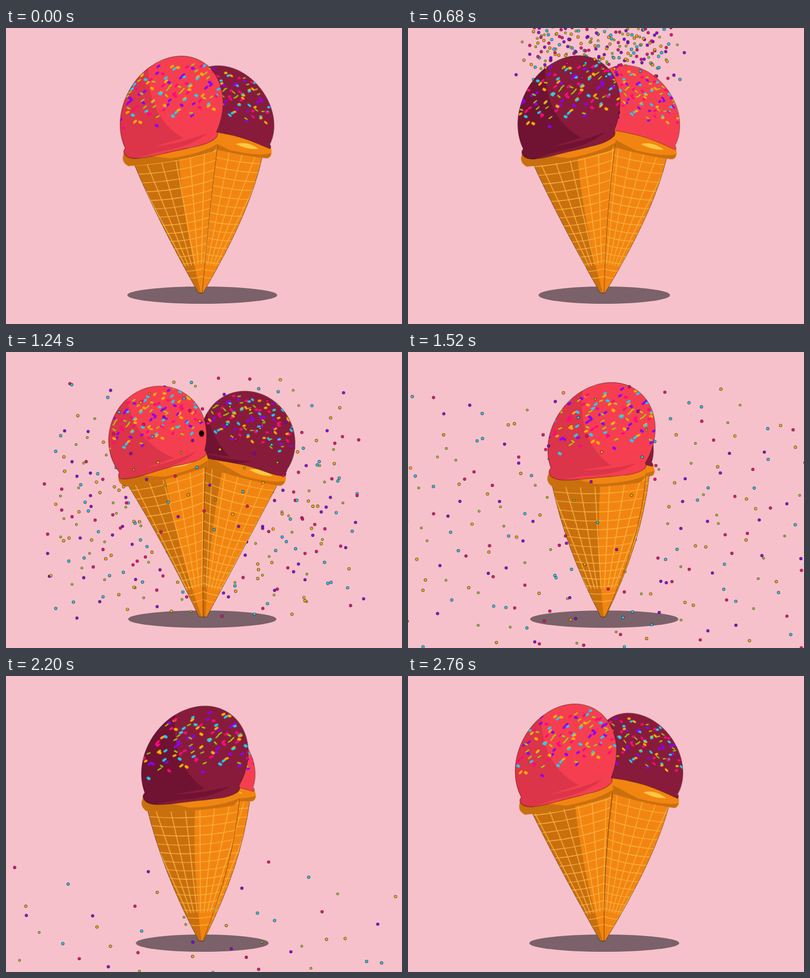
These frames come from a looping animation (800x600 px, 2.8 s). An HTML page without scripts:

```html
<!DOCTYPE html>
<html lang="en">
<head>
<meta charset="utf-8">
<title>Twin cones</title>
<style>
html, body { margin: 0; width: 100%; height: 100%; overflow: hidden; background: #f6c1cb; }
svg { position: absolute; left: 0; top: 0; width: 800px; height: 600px; }
.defs, .floor { z-index: 0; }
.over { z-index: 3; }

/* One turn takes 1400 ms; 0% is the pose nearest the viewer. */
.pink { --main: #f53f50; --shade: #dc3448; --turn: -1255ms; }
.plum { --main: #881b3b; --shade: #701231; --turn: -555ms; }
.pink, .plum { animation: depth 1400ms step-end var(--turn) infinite; }
.head, .axis, .body, .dome, .side, .dusk, .face { animation: head 1400ms linear var(--turn) infinite; }
.axis { animation-name: axis; }
.body { animation-name: body; }
.dome { animation-name: dome; }
.side { animation-name: side; }
.dusk { animation-name: dusk; }
.face { animation-name: face; }
.fan { animation: fan 70ms linear infinite; }
.slide { animation: slide 700ms linear infinite; }
.open { animation: open 1400ms step-end var(--turn) infinite; }
.happy { animation: happy 1400ms step-end var(--turn) infinite; }
.outline { fill: none; stroke: #000; stroke-opacity: .45; }
.shadow { transform-origin: 396.5px 541.5px; animation: shadow 700ms cubic-bezier(.37,0,.63,1) -20ms infinite alternate; }

@keyframes depth { 0% { z-index: 2 } 25% { z-index: 1 } 75%, 100% { z-index: 2 } }
@keyframes head {
  0%, 100% { transform: translate(392px,246px) rotate(-1deg) skewX(-10deg) scale(1.1,1.17) }
  11% { transform: translate(440px,242px) rotate(8deg) skewX(-6deg) scale(1.06,1.12) }
  24% { transform: translate(488px,233px) rotate(15deg) skewX(0deg) scale(1,1) }
  37.5% { transform: translate(463px,229px) rotate(14deg) skewX(14deg) scale(.95,.96) }
  49% { transform: translate(408px,229px) rotate(2deg) skewX(14deg) scale(.95,.94) }
  61% { transform: translate(345px,222px) rotate(-14deg) skewX(0deg) scale(.95,.92) }
  74% { transform: translate(316px,229px) rotate(-14.4deg) skewX(0deg) scale(1,1.02) }
  87.5% { transform: translate(320px,241px) rotate(-11.5deg) skewX(-12deg) scale(1.07,1.15) }
}
@keyframes axis {
  0%, 100% { transform: translate(394px,540px) rotate(0deg) scale(1.15,1) }
  11% { transform: translate(391px,540px) rotate(8.5deg) scale(1.1,1) }
  24% { transform: translate(404px,540px) rotate(15.4deg) scale(1,1.04) }
  37.5% { transform: translate(395px,540px) rotate(13deg) scale(.95,1.03) }
  49% { transform: translate(396px,540px) rotate(2deg) scale(.95,1) }
  61% { transform: translate(391px,540px) rotate(-9deg) scale(.95,1.03) }
  74% { transform: translate(395px,540px) rotate(-14.4deg) scale(1,1.04) }
  87.5% { transform: translate(392px,540px) rotate(-12.5deg) scale(1.1,1.02) }
}
@keyframes body {
  0%, 100% { d: path("M296 260Q320 401 390 537L398 537Q482 380 491 255Z") }
  11% { d: path("M352 240Q347 391 386 537L397 537Q440 381 522 260Z") }
  24% { d: path("M399 222Q398 390 401 537L409 537Q478 398 562 266Z") }
  37.5% { d: path("M393 222Q391 390 391 537L398 537Q500 370 526 262Z") }
  49% { d: path("M325 245Q340 400 391 537L399 537Q470 390 485 250Z") }
  61% { d: path("M284 258Q369 402 386 537L395 537Q395 390 425 215Z") }
  74% { d: path("M243 265Q335 403 391 537L399 537Q398 390 398 222Z") }
  87.5% { d: path("M246 268Q299 380 388 537L396 537Q393 390 414 232Z") }
}
@keyframes dome {
  0%, 11%, 87.5%, 100% { d: path("M-88-2Q-92-7-87-12A98 98 0 1 1 87-14Q91-9 87-4C72 8 40 6 0 8S-78 15-88-2Z") }
  24%, 74% { d: path("M-88 5Q-92-2-87-8A98 98 0 1 1 87-12Q91-8 87-2C66 8 40 2 10 2S-62 10-88 5Z") }
  37.5%, 61% { d: path("M-88-1Q-92-6-87-10A98 98 0 1 1 87-10Q91-6 87-1C62-6 34-13 0-13S-62-12-88-1Z") }
}
@keyframes side {
  0%, 11%, 100% { transform: skewX(-2deg) }
  24% { transform: skewX(6deg) }
  37.5% { transform: skewX(9deg) }
  61%, 87.5% { transform: skewX(-3deg) }
  74% { transform: skewX(0deg) }
}
@keyframes dusk {
  0%, 11%, 74%, 100% { transform: translateX(0) }
  24% { transform: translateX(-45px) }
  37.5% { transform: translateX(-80px) }
  61% { transform: translateX(-15px) }
}
@keyframes face {
  0%, 25% { transform: translate(-140px,-42px) }
  36% { transform: translate(-84px,-44px) }
  39% { transform: translate(-52px,-46px) }
  61% { transform: translate(-8px,-53px) }
  74% { transform: translate(68px,-39px) }
  82% { transform: translate(145px,-39px) }
  82.01%, 100% { transform: translate(-140px,-42px) }
}
@keyframes open { 0% { opacity: 1 } 48% { opacity: 0 } 72%, 100% { opacity: 1 } }
@keyframes happy { 0% { opacity: 0 } 48% { opacity: 1 } 72%, 100% { opacity: 0 } }
@keyframes fan { to { transform: skewX(-5.52deg) } }
@keyframes slide { to { transform: translateX(314px) } }
@keyframes shadow { from { transform: scaleX(1) } to { transform: scaleX(.877) } }

/* Confetti clouds: a unit cloud is moved and stretched, its dots keep their size. */
.cloud { animation: wide 2800ms linear infinite; }
.plume { animation-name: plume; }
.near { animation-name: near; }
.brief { animation-name: brief; }
.dots path { fill: none; stroke-linecap: round; vector-effect: non-scaling-stroke; stroke-width: var(--w, 4.8px); }
.edge { --ink: #2b1822; --w: 6.2px; }
@keyframes wide {
  0%, 20% { transform: translate(390px,-130px) scale(1.6,.8) }
  24.3% { transform: translate(390px,20px) scale(1.75,.95) }
  35.7% { transform: translate(400px,220px) scale(2.4,2) }
  54.3% { transform: translate(400px,335px) scale(4.1,2.7) }
  67.1% { transform: translate(400px,450px) scale(4.3,2.5) }
  78.6% { transform: translate(400px,640px) scale(4.5,2.8) }
  95%, 100% { transform: translate(400px,1050px) scale(4.6,3) }
}
@keyframes plume {
  0%, 20% { transform: translate(390px,-140px) scale(1.3,.8) }
  24.3% { transform: translate(390px,10px) scale(1.4,1) }
  35.7% { transform: translate(395px,315px) scale(1.9,1.25) }
  54.3% { transform: translate(400px,370px) scale(4.2,2.5) }
  67.1% { transform: translate(400px,480px) scale(4.4,2.3) }
  78.6% { transform: translate(400px,740px) scale(4.6,2.6) }
  90%, 100% { transform: translate(400px,1000px) scale(4.6,2.6) }
}
@keyframes near {
  0%, 20% { transform: translate(390px,-120px) scale(1.1,.7) }
  24.3% { transform: translate(390px,25px) scale(1.3,.8) }
  35.7% { transform: translate(395px,125px) scale(1.7,.9) }
  54.3% { transform: translate(400px,310px) scale(4.3,2.5) }
  67.1% { transform: translate(400px,620px) scale(4.5,3) }
  78.6%, 100% { transform: translate(400px,1000px) scale(4.6,3) }
}
@keyframes brief {
  0%, 20% { transform: translate(390px,-130px) scale(1.4,.8) }
  24.3% { transform: translate(390px,25px) scale(1.5,.9) }
  35.7% { transform: translate(400px,190px) scale(1.9,1.4) }
  45% { transform: translate(400px,360px) scale(3.4,2) }
  57%, 100% { transform: translate(400px,900px) scale(5,2) }
}
</style>
</head>
<body>
<svg class="defs" viewBox="0 0 800 600">
  <defs>
    <g id="rim">
      <path fill="#f28511" d="M-88-8Q-96 10-80 20Q0 28 80 20Q95 14 88-8Q0-34-88-8Z"/>
      <path fill="#c96f0e" d="M-89-4Q-96 10-80 20Q0 28 80 20Q88 17 89 8Q60 20 0 19Q-20 14-40 8Z"/>
      <path fill="#ffc843" d="M12 4Q36-8 62 4Q40 11 12 4Z"/>
    </g>
    <path id="dusk" d="M-110-160H-48Q-52-62 24-12L-32-6Q20-4 70-14Q40 4-12 4Q-50 4-110 20Z"/>

    <path id="wafer" fill="#f28511" d="M-180 20V-340H180V20Z"/>
    <path id="waferShade" fill="#c96f0e" d="M4 20Q-16-150-6-300V-340H-180V20Z"/>
    <path id="meridians" d="M-35-60-174-300M-29-60-145-300M-23-60-116-300M-17-60-87-300M-12-60-58-300M-6-60-29-300M0-60V-300M6-60 29-300M12-60 58-300M17-60 87-300M23-60 116-300M29-60 145-300M35-60 174-300"/>
    <path id="parallels" d="M-120-284q120 26 240 0M-112-265q112 25 224 0M-104-246q104 24 208 0M-96-227q96 23 192 0M-90-208q90 22 180 0M-84-190q84 21 168 0M-77-172q77 20 154 0M-70-154q70 18 140 0M-64-136q64 16 128 0M-57-119q57 15 114 0M-50-102q50 13 100 0M-44-85q44 11 88 0M-37-69q37 9 74 0M-30-53q30 8 60 0M-22-37q22 6 44 0"/>

    <g id="sprinkles" fill="none" stroke-linecap="round" stroke-width="4.3">
      <path stroke="#1cd3f5" d="M8-92l3-2M31-128l3-2M52-66l3-2M77-112l3-1M96-137l2-1M118-84l3-2M141-121l3-1M163-58l3-2M187-101l3-2M214-131l3-1M239-75l3-2M268-116l3-2M294-48l3-2"/>
      <path stroke="#ffb300" d="M17-111l3-2M40-81l3-2M62-134l3-1M85-54l3-2M107-118l3-2M131-97l3-1M152-139l3-1M178-79l3-2M202-113l3-2M225-60l3-2M250-127l3-1M277-90l3-2M303-134l2-1"/>
      <path stroke="#8b00ff" d="M4-136l3-1M26-61l3-2M47-106l3-2M70-88l3-2M92-101l3-2M124-132l3-1M146-73l3-2M170-117l3-2M194-48l3-2M219-92l3-2M244-105l3-2M263-139l3-1M288-72l3-2"/>
      <path stroke="#ff0a7c" d="M13-70l3-2M36-98l3-2M58-120l3-1M81-75l3-2M112-62l3-2M136-108l3-2M158-91l3-2M181-134l3-1M208-71l3-2M232-119l3-1M257-57l3-2M283-104l3-2M307-86l3-2"/>
      <path stroke="#9be800" stroke-width="2.2" d="M21-142l4-2M44-50l5-3M67-100l5-2M89-124l5-2M102-76l5-3M127-56l5-2M149-105l5-3M174-94l4-4M198-124l5-2M221-108l5-3M246-88l5-3M271-66l4-3M298-119l5-2"/>
    </g>
    <g id="tile">
      <use href="#sprinkles"/>
      <use href="#sprinkles" transform="translate(326 -2) rotate(-3) scale(-1 1.02)"/>
      <use href="#sprinkles" transform="translate(323 -188) scale(-1 -.9)"/>
    </g>

    <g id="eyes"><ellipse cx="-23" cy="-6" rx="5" ry="6"/><ellipse cx="22" cy="-6" rx="4.5" ry="6"/></g>
    <path id="mouth" d="M-9 1Q0 4 9-1Q9 11 1 12Q-7 11-9 1Z"/>

    <g id="dots" class="dots">
      <path style="stroke:var(--ink,#1cd3f5)" d="M-94-31h.01M-76 62h.01M-61-78h.01M-48 14h.01M-39 83h.01M-28-44h.01M-17 39h.01M-8-91h.01M4-14h.01M13 71h.01M24-57h.01M35 24h.01M47-83h.01M58 54h.01M73-22h.01M91 88h.01"/>
      <path style="stroke:var(--ink,#ffb300)" d="M-89 47h.01M-80-62h.01M-66 5h.01M-54 94h.01M-42-33h.01M-33 57h.01M-21-72h.01M-12 8h.01M2 43h.01M10-48h.01M20 91h.01M31-8h.01M43 66h.01M55-38h.01M69 17h.01M86-69h.01"/>
      <path style="stroke:var(--ink,#8b00ff)" d="M-98 78h.01M-72-12h.01M-58 42h.01M-50-55h.01M-36 3h.01M-25-87h.01M-15 76h.01M-5-36h.01M7 19h.01M17-75h.01M27 48h.01M39-29h.01M50 3h.01M64 81h.01M78-49h.01M96 31h.01"/>
      <path style="stroke:var(--ink,#ff0a7c)" d="M-85-90h.01M-69 29h.01M-56-24h.01M-45 68h.01M-31-62h.01M-23 21h.01M-11 96h.01M-1-68h.01M9 56h.01M19-25h.01M29-94h.01M41 39h.01M53-58h.01M62 27h.01M81-7h.01M98-41h.01"/>
      <path style="stroke:var(--ink,#9be800);stroke-width:calc(var(--w,4.8px) - 1.2px)" d="M-91 8h.01M-74-43h.01M-63 81h.01M-52-8h.01M-40 34h.01M-29-15h.01M-19 61h.01M-9-54h.01M5 86h.01M15 4h.01M26-36h.01M37 77h.01M48-17h.01M60-71h.01M75 46h.01M88 14h.01"/>
    </g>
    <g id="confetti"><use href="#dots" class="edge"/><use href="#dots"/></g>
  </defs>
</svg>

<svg class="floor" viewBox="0 0 800 600">
  <ellipse class="shadow" cx="396.5" cy="541.5" rx="151.5" ry="17.5" fill="#7b6169"/>
  <g class="cloud"><use href="#confetti"/></g>
  <g class="cloud plume"><use href="#confetti" transform="rotate(90)"/></g>
  <g class="cloud brief">
    <use href="#confetti" transform="scale(-1 1)"/>
    <use href="#confetti" transform="rotate(90) scale(-1 1)"/>
  </g>
</svg>

<svg class="pink" viewBox="0 0 800 600">
  <clipPath id="pinkCone"><path class="body"/></clipPath>
  <clipPath id="pinkDome"><path class="dome"/></clipPath>
  <g clip-path="url(#pinkCone)">
    <g class="axis">
      <use href="#wafer"/>
      <g class="side"><use href="#waferShade"/></g>
      <g fill="none" stroke="#f9b440" stroke-width="1.4">
        <use href="#parallels"/>
        <g class="fan"><use href="#meridians"/></g>
      </g>
    </g>
  </g>
  <path class="body outline"/>
  <g class="head">
    <use href="#rim"/>
    <path class="dome" fill="var(--main)"/>
    <g clip-path="url(#pinkDome)">
      <g class="dusk"><use href="#dusk" fill="var(--shade)"/></g>
      <g class="slide"><use href="#tile" x="-471"/><use href="#tile" x="-157"/></g>
      <g class="face">
        <g class="open"><use href="#eyes"/></g>
        <path class="happy" fill="none" stroke="#000" stroke-width="2" d="M-36 0q3-9 9-8t7 7M22 0q3-9 9-8t7 7"/>
        <use href="#mouth"/>
      </g>
    </g>
    <path class="dome outline"/>
  </g>
</svg>

<svg class="plum" viewBox="0 0 800 600">
  <clipPath id="plumCone"><path class="body"/></clipPath>
  <clipPath id="plumDome"><path class="dome"/></clipPath>
  <g clip-path="url(#plumCone)">
    <g class="axis">
      <use href="#wafer"/>
      <g class="side"><use href="#waferShade"/></g>
      <g fill="none" stroke="#f9b440" stroke-width="1.4">
        <use href="#parallels"/>
        <g class="fan"><use href="#meridians"/></g>
      </g>
    </g>
  </g>
  <path class="body outline"/>
  <g class="head">
    <use href="#rim"/>
    <path class="dome" fill="var(--main)"/>
    <g clip-path="url(#plumDome)">
      <g class="dusk"><use href="#dusk" fill="var(--shade)"/></g>
      <g class="slide"><use href="#tile" x="-471"/><use href="#tile" x="-157"/></g>
      <g class="face"><use href="#eyes"/><use href="#mouth"/></g>
    </g>
    <path class="dome outline"/>
  </g>
</svg>

<svg class="over" viewBox="0 0 800 600">
  <g class="cloud near"><use href="#confetti" transform="rotate(180)"/></g>
</svg>
</body>
</html>
```
